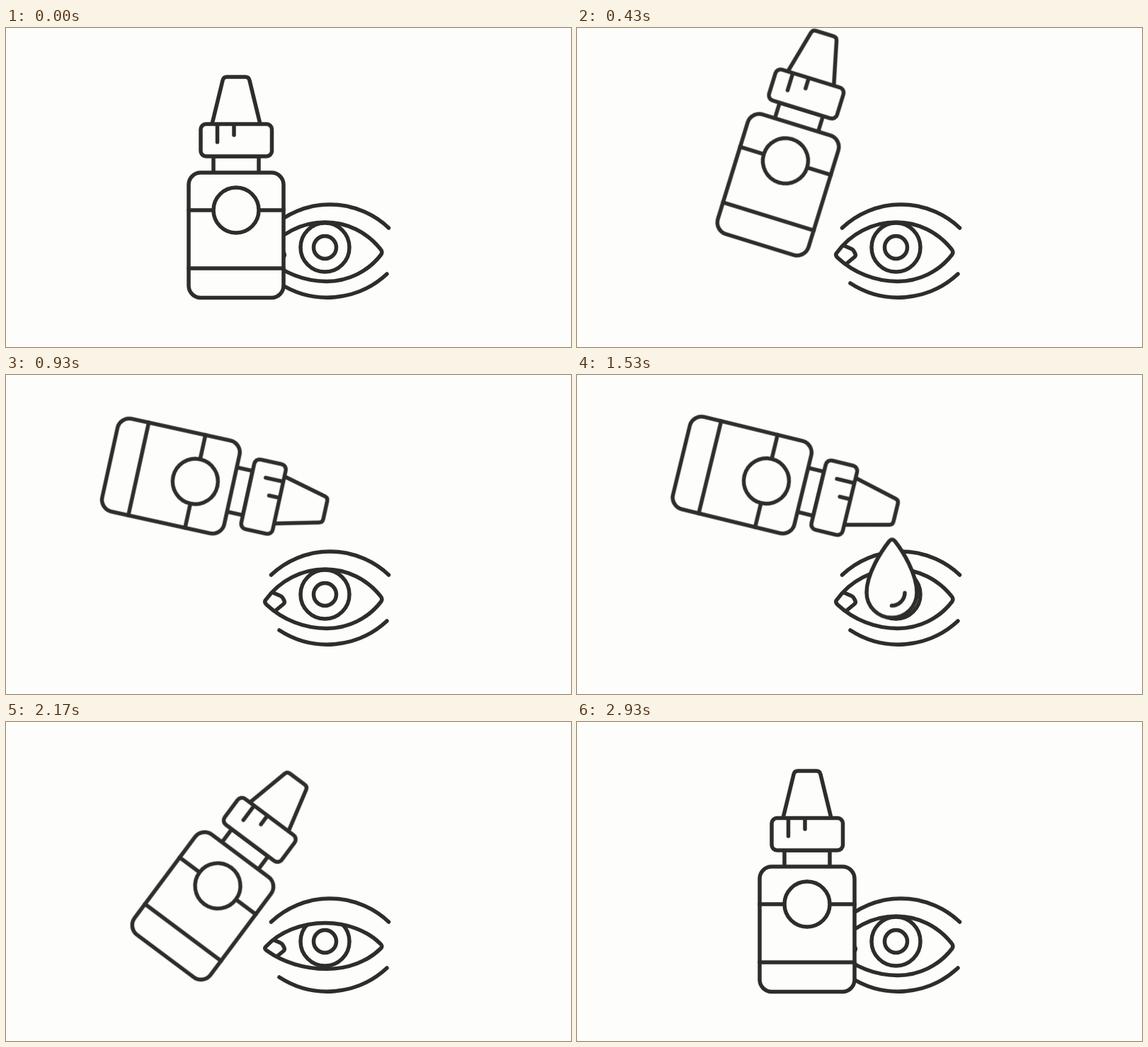
These frames come from a looping animation (798 by 450 pixels, 2.96 s). An HTML page:

```html
<!DOCTYPE html>
<html lang="en">
<head>
<meta charset="utf-8">
<title>Eye drops</title>
<style>
  html, body { margin: 0; width: 100%; height: 100%; overflow: hidden; background: #fdfdfb; }
  svg {
    display: block; width: 100%; height: 100%;
    fill: none; stroke: #2d2d2a; stroke-width: 5.5;
    stroke-linecap: round; stroke-linejoin: round;
  }
  .solid { fill: #fdfdfb; }

  .slide, .lift, .turn, .fall, .grow, .lid {
    animation: 2960ms cubic-bezier(.37, 0, .63, 1) infinite;
  }
  .slide { animation-name: slide; }
  .lift { animation-name: lift; }
  .turn { animation-name: turn; transform-origin: 325px 227px; }
  .fall { animation-name: fall; animation-timing-function: cubic-bezier(.333, 0, .667, .333); }
  .grow { animation-name: grow; transform-origin: 445px 231px; }
  .lid { animation-name: blink; }

  @keyframes slide {
    0%, 1.01%, 82.47%, 100% { transform: translateX(0); }
    21.05%, 56.96% { transform: translateX(-28.4px); }
  }
  @keyframes lift {
    0%, 1.01%, 82.47%, 100% { transform: translateY(0); }
    16.28%, 56.96% { transform: translateY(-70.4px); }
  }
  @keyframes turn {
    0%, 7.7%, 84.19%, 100% { transform: rotate(0deg); }
    33.28%, 57.53% { transform: rotate(103.7deg); }
  }
  @keyframes fall {
    0%, 46.62% { transform: translateY(-20px); }
    64.86%, 100% { transform: translateY(240px); }
  }
  @keyframes grow {
    0%, 37.16% { transform: scale(0); }
    47.3%, 100% { transform: scale(1); }
  }
  /* the outline is morphed, so its stroke keeps its weight */
  @keyframes blink {
    0%, 70.95%, 86.82%, 100% {
      d: path("M367 317 C386.4 290 417.7 274 451 274 C481.5 274 510.2 288 529 312 Q532.5 316 529.5 320 C511.1 343.7 483 357.5 453 357.5 C421.5 357.5 391 345.5 368 324 Q364 320 367 317 Z");
    }
    78.38%, 79.39% {
      d: path("M367 316.5 C386.4 315.3 417.7 314.6 451 314.6 C481.5 314.6 510.2 315.2 529 316.3 Q532.5 316.5 529.5 316.7 C511.1 317.7 483 318.3 453 318.3 C421.5 318.3 391 317.8 368 316.8 Q364 316.7 367 316.5 Z");
    }
  }
</style>
</head>
<body>
<svg viewBox="0 0 798 450">
  <clipPath id="opening"><path class="lid"/></clipPath>

  <!-- eye -->
  <path d="M374.5 282 A121 121 0 0 1 540.5 282 M386 360 A124 124 0 0 0 538 347"/>
  <g clip-path="url(#opening)">
    <circle cx="450.5" cy="309.5" r="34.5"/>
    <circle cx="450.5" cy="309.5" r="16"/>
    <path d="M377 307 L387.5 311.5 Q390 312.5 391.5 315.5 L393 318.5 Q394 321 392 323 L380.5 332.5"/>
  </g>
  <path class="lid"/>

  <!-- drop -->
  <g class="fall"><g class="grow">
    <path class="solid" d="M441 234 Q445 229.5 449 234 C460 248 480 280 480 306.5
      A35.5 35.5 0 0 1 409 306.5 C409 280 430 248 441 234 Z"/>
    <path d="M463 307 A18.5 18.5 0 0 1 444.5 325"/>
  </g></g>

  <!-- bottle -->
  <g class="slide"><g class="lift"><g class="turn">
    <path class="solid" d="M291 135.5 L306 74 Q307 69 312 69 H338 Q343 69 344 74 L359 135.5"/>
    <path class="solid" d="M293 204 V181 H357 V204"/>
    <rect class="solid" x="275" y="135.5" width="100.5" height="45.5" rx="7.5"/>
    <path d="M298.5 136 V161 M322 136 V151"/>
    <rect class="solid" x="258" y="204" width="134" height="176.5" rx="17"/>
    <path d="M258 257 H392 M258 339 H392"/>
    <circle class="solid" cx="325" cy="257" r="32"/>
  </g></g></g>
</svg>
</body>
</html>
```
